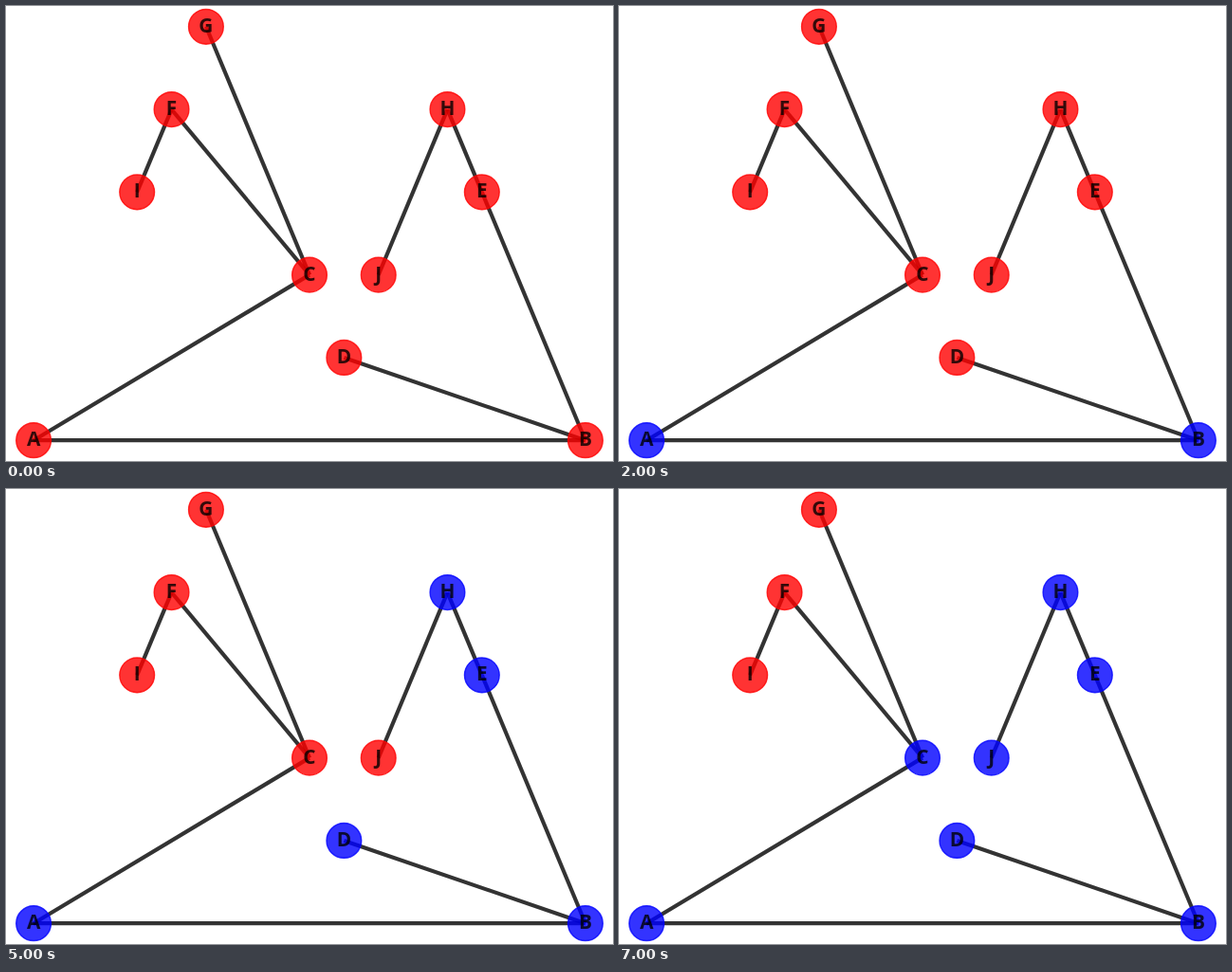
These frames come from a looping animation (640x480 px, 8000 ms). An HTML page:

```html
<!DOCTYPE html>
<html lang="en">
<head>
<meta charset="utf-8">
<title>Graph traversal</title>
<style>
html, body { margin: 0; width: 100%; height: 100%; overflow: hidden; background: #fff; }
svg { display: block; width: 640px; height: 480px; }
line { stroke: #000; stroke-opacity: .8; stroke-width: 4.17; }
circle { fill-opacity: .8; stroke-opacity: .8; stroke-width: 1.39; }
text { font: bold 20.83px "Open Sans", sans-serif; text-anchor: middle; fill: #000; fill-opacity: .8; }
</style>
</head>
<body>
<svg id="stage" viewBox="0 0 640 480"></svg>
<script>
const LOOP = 8000, STEP = 1000;
const ORDER = "ABDEHJC";
const EDGES = ["AB", "AC", "BD", "BE", "CF", "CG", "EH", "FI", "HJ"];
// Column and row of each node on the layout grid
const GRID = {
  A: [0, 0], B: [16, 0], C: [8, 2], D: [9, 1], E: [13, 3],
  F: [4, 4], G: [5, 5], H: [12, 4], I: [3, 3], J: [10, 2]
};
const stage = document.getElementById("stage");
const nodes = {};

function add(tag, attrs) {
  const el = document.createElementNS("http://www.w3.org/2000/svg", tag);
  for (const key in attrs) el.setAttribute(key, attrs[key]);
  return stage.appendChild(el);
}

function place(name) {
  const [col, row] = GRID[name];
  return [(640 / 22) * (1 + col * 1.25), (480 / 22) * (21 - row * 4)];
}

for (const [from, to] of EDGES) {
  const [x1, y1] = place(from), [x2, y2] = place(to);
  add("line", { x1, y1, x2, y2 });
}
for (const name in GRID) {
  const [cx, cy] = place(name);
  nodes[name] = add("circle", { cx, cy, r: 18.37 });
}
for (const name in GRID) {
  const [x, y] = place(name);
  add("text", { x, y: y + 6 }).textContent = name;
}

function draw(time) {
  const count = Math.floor((time % LOOP) / STEP);
  for (const name in nodes) {
    const at = ORDER.indexOf(name);
    const color = at >= 0 && at < count ? "#00f" : "#f00";
    nodes[name].setAttribute("fill", color);
    nodes[name].setAttribute("stroke", color);
  }
}

const start = performance.now();
function tick() {
  draw(performance.now() - start);
  requestAnimationFrame(tick);
}
tick();
</script>
</body>
</html>
```
